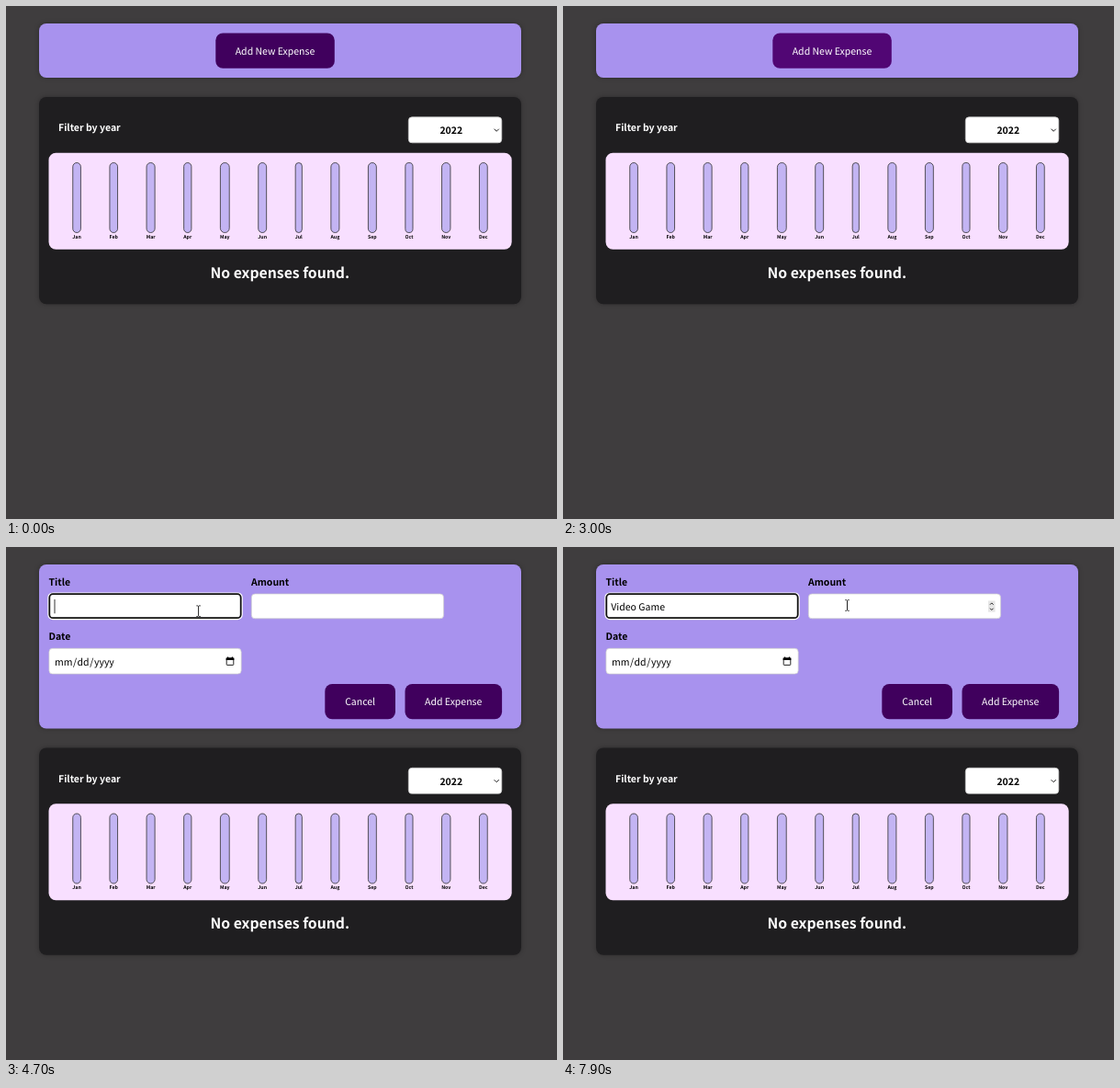
An HTML page that plays this animation: 600x558 px, repeating every 8000 ms.

```html
<!DOCTYPE html>
<html lang="en">
<head>
<meta charset="utf-8">
<title>Expense form</title>
<style>
  html, body { margin: 0; width: 100%; height: 100%; overflow: hidden; background: #3f3d3e; }
  svg { display: block; width: 600px; height: 558px; }
  text { font: 10.5px "Noto Sans CJK JP", "Noto Sans CJK SC", "Noto Sans CJK", "Noto Sans", sans-serif; text-rendering: geometricPrecision; white-space: pre; }
  .b { font-weight: 700; }
  .mid { text-anchor: middle; }
  .light { fill: #fff; }
  .card { filter: drop-shadow(0 .7px 2.6px rgba(0, 0, 0, .3)); }
  .btn rect { fill: #40005d; }
  .btn.hover rect { fill: #510674; }
  .field { fill: #fff; stroke: #ccc; stroke-width: .7; }
  .bar { fill: #c3b4f3; stroke: #313131; stroke-width: .8; }
  .month { font-size: 5.25px; }
  .line { fill: none; stroke: #222; stroke-width: 1; }
</style>
</head>
<body>
<svg viewBox="0 0 600 558">
  <rect id="top" class="card" x="36" y="19" width="525" height="59" rx="7.9" fill="#a892ee"/>

  <g id="closed">
    <g id="add" class="btn">
      <rect x="228.3" y="29.5" width="129.5" height="38.3" rx="7.9"/>
      <text class="mid light" x="293" y="53">Add New Expense</text>
    </g>
  </g>

  <g id="form">
    <text class="b" x="46.5" y="41.8">Title</text>
    <text class="b" x="267" y="41.8">Amount</text>
    <text class="b" x="46.5" y="101.2">Date</text>
    <rect class="field" x="46.9" y="51" width="209.3" height="26.8" rx="3.9"/>
    <rect class="field" x="267.3" y="51" width="209.3" height="26.8" rx="3.9"/>
    <rect class="field" x="46.9" y="110.3" width="209.3" height="27.8" rx="3.9"/>
    <text x="53" y="128.8">mm<tspan dx=".65">/</tspan><tspan dx=".65">dd</tspan><tspan dx=".65">/</tspan><tspan dx=".65">yyyy</tspan></text>
    <g id="calendar">
      <rect class="line" x="240.2" y="121" width="7.6" height="7.4" rx=".6"/>
      <path d="M239.7 120.5h8.6v2.6h-8.6zM241 119.5h1.2v2h-1.2zM245.8 119.5h1.2v2h-1.2z"/>
    </g>
    <g id="focus" fill="none">
      <rect x="46.9" y="51" width="209.3" height="26.6" rx="4" stroke="#fff" stroke-width="3.2"/>
      <rect x="47.3" y="51.2" width="208.4" height="26" rx="3.8" stroke="#101010" stroke-width="1.8"/>
    </g>
    <text id="typed" x="52.3" y="68.9"></text>
    <rect id="caret" y="57" width=".8" height="15.3"/>
    <g id="spinner">
      <rect x="463" y="58.5" width="7.6" height="12.2" fill="#e6e6e6"/>
      <path class="line" d="M465 62.7l1.8-1.8 1.8 1.8M465 66.7l1.8 1.8 1.8-1.8"/>
    </g>
    <g class="btn">
      <rect x="347.3" y="149" width="76.7" height="38.2" rx="7.9"/>
      <text class="mid light" x="385.6" y="172.4">Cancel</text>
    </g>
    <g class="btn">
      <rect x="434.5" y="149" width="105.6" height="38.2" rx="7.9"/>
      <text class="mid light" x="487.2" y="172.4">Add Expense</text>
    </g>
  </g>

  <g id="panel">
    <rect class="card" x="36" y="99" width="525" height="225.2" rx="7.9" fill="#1f1e20"/>
    <text class="b light" x="57" y="136.4">Filter by year</text>
    <rect class="field" x="438.3" y="120.8" width="101.5" height="28" rx="3.9"/>
    <text class="b mid" x="484.8" y="139">2022</text>
    <path class="line" stroke-width=".9" d="M531.6 133.7l2.6 2.6 2.6-2.6"/>
    <rect x="46.5" y="159.7" width="504.2" height="105" rx="7.9" fill="#f8dfff"/>
    <g id="chart"></g>
    <text class="b mid light" style="font-size:15.75px" x="298.3" y="295.8">No expenses found.</text>
  </g>

  <path id="arrow" d="M0 0V11.6L2.7 9.1 4.5 13 6.3 12.2 4.6 8.4H8.2Z" fill="#fff" stroke="#222" stroke-width=".8"/>
  <path id="beam" class="line" d="M-2.2 -5.8H-.8L0 -5.2 .8 -5.8H2.2M0 -5.2V5.2M-2.2 5.8H-.8L0 5.2 .8 5.8H2.2"/>
</svg>
<script>
const $ = id => document.getElementById(id);
const show = (id, on) => $(id).setAttribute('display', on ? 'inline' : 'none');

const LOOP = 8000, STEP = 100;
const HOVER = 2000, OPEN = 3600, FOCUS = 4600;
const TITLE = 'Video Game';
const KEYS = [5700, 5900, 6000, 6200, 6300, 6500, 6700, 6900, 7000, 7200];
// Pointer path: time, x, y
const PATH = [[4000, 295, 49], [4500, 209.6, 69.7], [7600, 209.6, 69.7], [7900, 309.5, 63.5]];

function make(tag, attrs, text = '') {
  const el = document.createElementNS('http://www.w3.org/2000/svg', tag);
  for (const k in attrs) el.setAttribute(k, attrs[k]);
  el.textContent = text;
  $('chart').append(el);
  return el;
}

// Each bar is as wide as its label; the rest is shared out evenly.
function buildChart() {
  const left = 57, width = 483;
  const labels = 'Jan Feb Mar Apr May Jun Jul Aug Sep Oct Nov Dec'.split(' ')
    .map(m => make('text', { class: 'b month', y: 252.9 }, m));
  const sizes = labels.map(l => l.getComputedTextLength());
  const gap = (width - sizes.reduce((a, b) => a + b)) / labels.length;
  let x = left + gap / 2;
  labels.forEach((label, i) => {
    const w = sizes[i];
    label.setAttribute('x', x);
    make('rect', { class: 'bar', x: x + .4, y: 170.5, width: w - .8, height: 76, rx: w / 2 - .4 });
    x += w + gap;
  });
}

function pointer(t) {
  let a = PATH[0], b = a;
  for (const p of PATH) {
    b = p;
    if (t < p[0]) break;
    a = p;
  }
  const p = a === b ? 0 : Math.max(0, (t - a[0]) / (b[0] - a[0]));
  const e = p * p * (3 - 2 * p);
  return [a[1] + (b[1] - a[1]) * e, a[2] + (b[2] - a[2]) * e];
}

function draw(now) {
  const t = Math.floor(now % LOOP / STEP) * STEP;
  const open = t >= OPEN, focused = t >= FOCUS;

  $('add').classList.toggle('hover', t >= HOVER);
  $('top').setAttribute('height', open ? 178.5 : 59);
  $('panel').setAttribute('transform', `translate(0 ${open ? 119.5 : 0})`);
  show('closed', !open);
  show('form', open);
  show('focus', focused);

  const count = KEYS.filter(k => k <= t).length;
  const typed = $('typed');
  typed.textContent = TITLE.slice(0, count);
  const blinkFrom = count ? KEYS[count - 1] : FOCUS;
  show('caret', focused && (t - blinkFrom) % 1000 < 500);
  $('caret').setAttribute('x', 52.6 + (open && count ? typed.getComputedTextLength() : 0));

  const [x, y] = pointer(t);
  const onRow = y > 51 && y < 78;
  const onAmount = onRow && x > 267 && x < 477;
  const onTitle = onRow && x > 47 && x < 256;
  const isBeam = onAmount || onTitle;
  show('spinner', onAmount);
  show('arrow', open && !isBeam);
  show('beam', open && isBeam);
  for (const id of ['arrow', 'beam']) $(id).setAttribute('transform', `translate(${x} ${y})`);
}

buildChart();
const start = performance.now();
function tick() {
  draw(performance.now() - start);
  requestAnimationFrame(tick);
}
tick();
</script>
</body>
</html>
```
